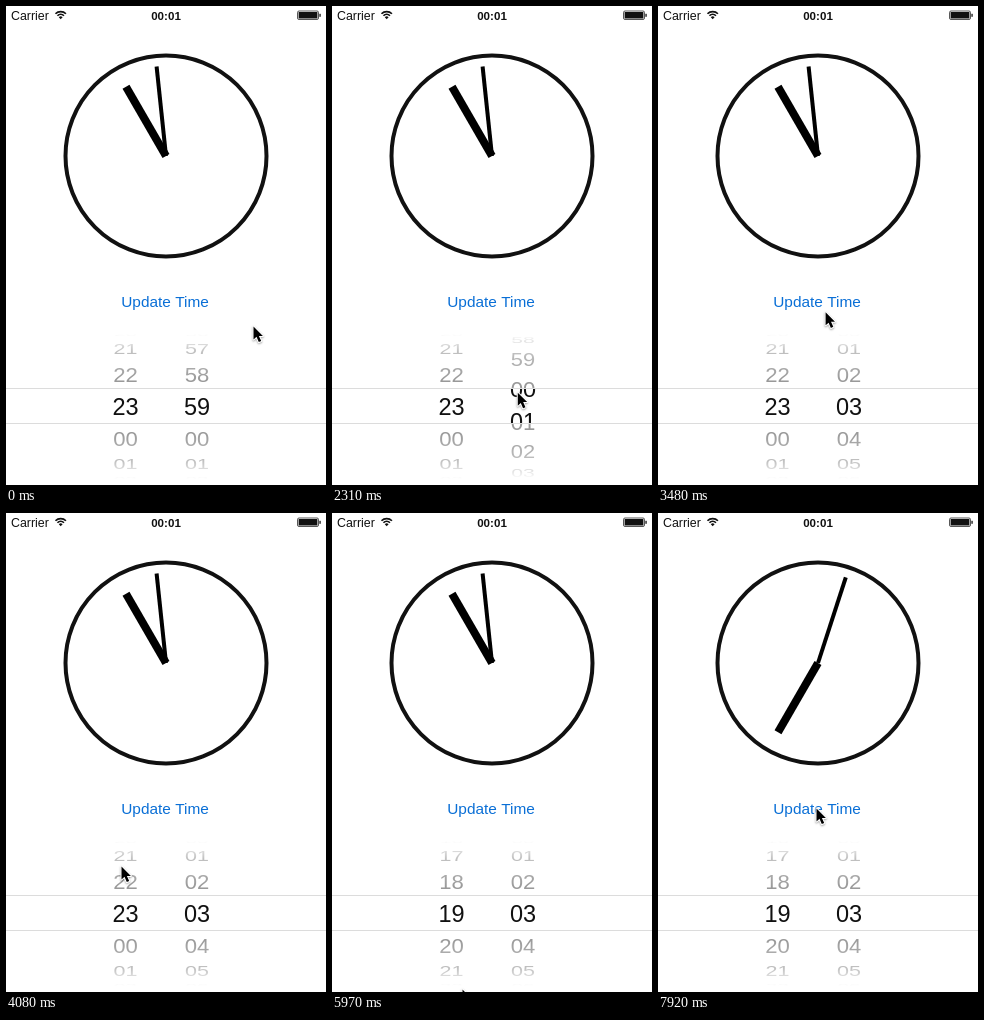
An HTML page with a canvas that plays this animation: 320x479 px, repeating every 9.22 s.

```html
<!DOCTYPE html>
<html lang="en">
<head>
<meta charset="utf-8">
<title>Clock picker</title>
<style>
html, body { margin: 0; height: 100%; overflow: hidden; background: #fff; }
canvas { display: block; }
</style>
</head>
<body>
<canvas id="stage" width="320" height="479"></canvas>
<script>
const ctx = document.getElementById('stage').getContext('2d');
const LOOP = 9220;
const FONT = '"Liberation Sans", Arial, sans-serif';
const MID = 400.5, RADIUS = 75, STEP = 0.44, ROW = 32, SLOP = 10;

const clamp = (v, a = 0, b = 1) => Math.min(b, Math.max(a, v));
const mix = (a, b, p) => a + (b - a) * p;
const part = (t, start, end) => clamp((t - start) / (end - start));
const smooth = p => p * p * (3 - 2 * p);
const easeOut = p => 1 - (1 - p) ** 3;
const speedUp = p => p ** 1.53;

// cubic-bezier(.25, .1, .25, 1)
function ease(p) {
  const bez = (s, a, b) => 3 * s * (1 - s) ** 2 * a + 3 * s * s * (1 - s) * b + s ** 3;
  let lo = 0, hi = 1;
  for (let i = 0; i < 20; i++) {
    const s = (lo + hi) / 2;
    if (bez(s, 0.25, 0.25) < p) lo = s; else hi = s;
  }
  return bez(lo, 0.1, 1);
}

// Pointer stops: time, x, y, easing on the way there
const path = [
  [60, 247.5, 320.5],
  [930, 186.5, 445.5, smooth],
  [1410, 186.5, 445.5],
  [2850, 185, 325, speedUp],
  [3150, 185, 325],
  [3450, 168, 306, smooth],
  [4050, 115.5, 353.5, smooth],
  [4080, 115.5, 353.5],
  [4980, 128, 486, smooth],
  [5910, 128, 486],
  [5970, 130.5, 476.5, smooth],
  [6330, 152, 357, smooth],
  [6450, 152, 357],
  [6660, 158.5, 295.5, smooth]
];

function pointer(t) {
  const i = path.findIndex(k => k[0] > t);
  if (i < 0) return path[path.length - 1].slice(1, 3);
  if (i === 0) return path[0].slice(1, 3);
  const a = path[i - 1], b = path[i];
  const p = (b[3] || smooth)(part(t, a[0], b[0]));
  return [mix(a[1], b[1], p), mix(a[2], b[2], p)];
}

// Rows dragged by the pointer between two times
function dragged(t, start, end) {
  const d = pointer(clamp(t, start, end))[1] - pointer(start)[1];
  return Math.sign(d) * Math.max(0, Math.abs(d) - SLOP) / ROW;
}

function line(x1, y1, x2, y2, width, color) {
  ctx.lineWidth = width;
  ctx.strokeStyle = color;
  ctx.beginPath();
  ctx.moveTo(x1, y1);
  ctx.lineTo(x2, y2);
  ctx.stroke();
}

function text(str, x, y, font, color, align = 'center') {
  ctx.font = font + ' ' + FONT;
  ctx.fillStyle = color;
  ctx.textAlign = align;
  ctx.fillText(str, x, y);
}

function statusBar() {
  text('Carrier', 5, 13.5, '12.4px', '#111', 'left');
  text('00:01', 160, 13.5, 'bold 11.6px', '#111');
  ctx.strokeStyle = ctx.fillStyle = '#111';
  ctx.lineWidth = 1.7;
  for (const r of [8, 5.2]) {
    ctx.beginPath();
    ctx.arc(54.7, 13, r - 0.6, -Math.PI * 0.75, -Math.PI * 0.25);
    ctx.stroke();
  }
  ctx.beginPath();
  ctx.moveTo(54.7, 13.2);
  ctx.arc(54.7, 13.2, 2.7, -Math.PI * 0.75, -Math.PI * 0.25);
  ctx.fill();
  ctx.lineWidth = 0.7;
  ctx.beginPath();
  ctx.roundRect(291.5, 5, 21, 8.5, 1.5);
  ctx.stroke();
  ctx.fillRect(292.6, 6, 18.8, 6.5);
  ctx.fillRect(313.4, 7.8, 1.3, 3);
}

function hand(deg, length, width) {
  const a = deg * Math.PI / 180;
  line(160, 150, 160 + length * Math.sin(a), 150 - length * Math.cos(a), width, '#000');
}

function clock(t) {
  const p = ease(part(t, 6780, 7780));
  ctx.lineWidth = 4;
  ctx.strokeStyle = '#111';
  ctx.beginPath();
  ctx.arc(160, 150, 100.5, 0, 7);
  ctx.stroke();
  hand(mix(330, 210, p), 80, 8);
  hand(mix(-6, 18, p), 90, 4);
}

function rows(x, value, count, size, color) {
  const near = Math.round(value);
  for (let i = near - 3; i <= near + 3; i++) {
    const a = (i - value) * STEP;
    if (Math.abs(a) > 1.4) continue;
    ctx.save();
    ctx.translate(x, MID + RADIUS * Math.sin(a));
    ctx.scale(0.9 + 0.1 * Math.cos(a), Math.cos(a));
    text(String((i + count) % count).padStart(2, '0'), 0, size * 0.35, size + 'px', color);
    ctx.restore();
  }
}

function clipped(bands, draw) {
  ctx.save();
  ctx.beginPath();
  for (const [y, h] of bands) ctx.rect(0, y, 320, h);
  ctx.clip();
  draw();
  ctx.restore();
}

function picker(t) {
  const hourEnd = 23 - dragged(4980, 4080, 4980);
  const hour = t < 4980 ? 23 - dragged(t, 4080, 4980)
    : mix(hourEnd, 19, easeOut(part(t, 4980, 5220)));
  const minEnd = 59 - dragged(2850, 1410, 2850);
  const minute = t < 3120 ? 59 - dragged(t, 1410, 2850)
    : mix(minEnd, 63, easeOut(part(t, 3120, 3450)));
  const wheels = (size, color) => {
    rows(119.5, hour, 24, size, color);
    rows(191, minute, 60, size, color);
  };
  clipped([[320, 63], [418, 61]], () => wheels(22.3, '#999'));
  clipped([[383, 35]], () => wheels(23.5, '#111'));

  const fade = ctx.createLinearGradient(0, 328, 0, 473);
  for (const [at, alpha] of [[0, 1], [0.12, 0.4], [0.32, 0]]) {
    fade.addColorStop(at, `rgba(255,255,255,${alpha})`);
    fade.addColorStop(1 - at, `rgba(255,255,255,${alpha})`);
  }
  ctx.fillStyle = fade;
  ctx.fillRect(0, 320, 320, 159);
  line(0, 382.5, 320, 382.5, 1, '#dcdcdc');
  line(0, 417.5, 320, 417.5, 1, '#dcdcdc');
}

function button(t) {
  ctx.globalAlpha = t < 6690 ? 1 : mix(0.25, 1, smooth(part(t, 6780, 7230)));
  text('Update Time', 159, 300.5, '15.4px', '#0a6fd6');
  ctx.globalAlpha = 1;
}

function cursor(t) {
  const [x, y] = pointer(t);
  const arrow = [0, 0, 0, 13, 3, 10.3, 5.3, 15.6, 7.7, 14.5, 5.4, 9.4, 9.4, 9.4];
  ctx.save();
  ctx.translate(x, y);
  ctx.beginPath();
  for (let i = 0; i < arrow.length; i += 2) ctx.lineTo(arrow[i], arrow[i + 1]);
  ctx.closePath();
  ctx.lineJoin = 'round';
  ctx.lineWidth = 2;
  ctx.strokeStyle = '#fff';
  ctx.shadowColor = 'rgba(0,0,0,.35)';
  ctx.shadowBlur = 2;
  ctx.shadowOffsetY = 1;
  ctx.stroke();
  ctx.shadowColor = 'transparent';
  ctx.fillStyle = '#000';
  ctx.fill();
  ctx.restore();
}

function frame() {
  const t = performance.now() % LOOP;
  ctx.fillStyle = '#fff';
  ctx.fillRect(0, 0, 320, 479);
  statusBar();
  clock(t);
  button(t);
  picker(t);
  cursor(t);
  requestAnimationFrame(frame);
}
frame();
</script>
</body>
</html>
```
